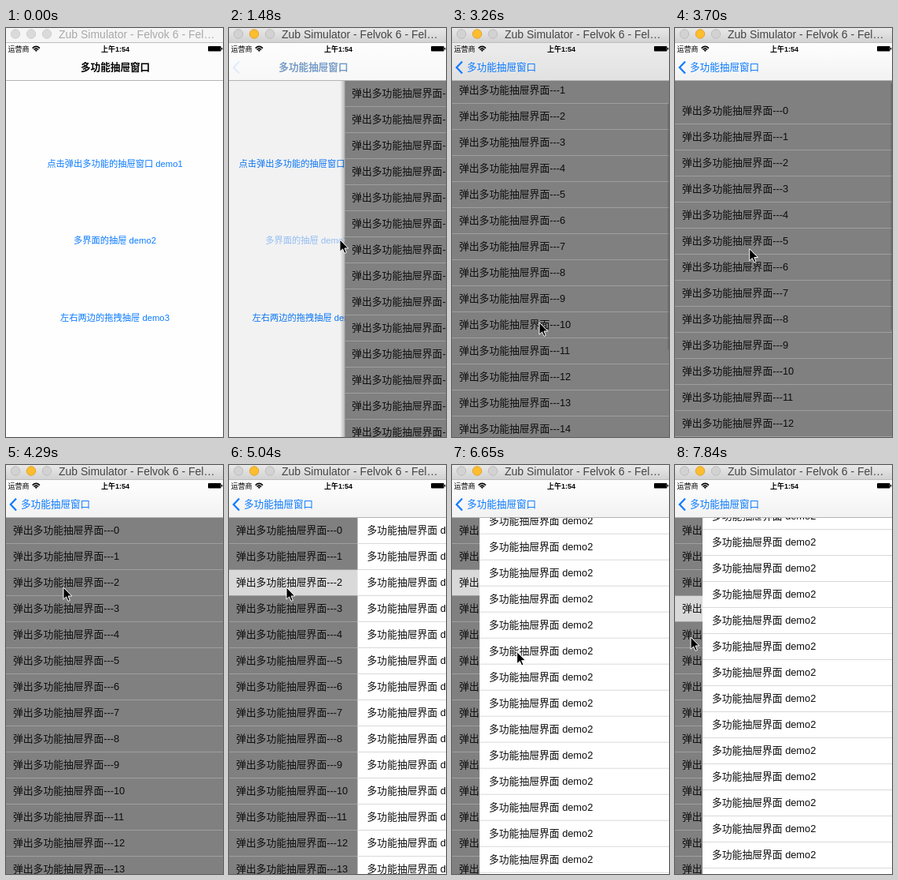
Write an HTML page that moves like this. It is 276 px wide and 518 px high and loops after 7.99 s.

```html
<!DOCTYPE html>
<html lang="zh-CN">
<head>
<meta charset="utf-8">
<title>抽屉窗口</title>
<style>
  html, body { margin: 0; width: 100%; height: 100%; overflow: hidden; background: #fff; }
  svg { display: block; width: 100%; height: 100%; }
  text { font-family: "Liberation Sans", "Noto Sans CJK SC", "Noto Sans CJK JP", sans-serif; white-space: pre; }
  .row { font-size: 12.8px; fill: #0c0c0c; }
  .link { font-size: 11.25px; fill: #0a7aff; text-anchor: middle; }
  .nav { font-size: 12.6px; }
  .status { font-size: 9px; }
  .bold { font-weight: bold; }

  #caption { font-size: 14px; fill: #a9a9a9; }
  #bar-bg { fill: #f5f5f5; }
  #lights { fill: #dadada; stroke: #cfcfcf; }
  .active #caption { fill: #454545; }
  .active #bar-bg { fill: url(#bar); }
  .active #lights { fill: #d2d2d2; stroke: #bcbcbc; }
  .active #middle { fill: #fdbd2e; stroke: #e2a329; }
  .active #pressed { opacity: .42; }
</style>
</head>
<body>
<svg id="stage" viewBox="0 0 276 518">
  <defs>
    <linearGradient id="bar" x2="0" y2="1">
      <stop stop-color="#e8e8e8"/><stop offset="1" stop-color="#d1d1d1"/>
    </linearGradient>
    <linearGradient id="tint" x2="0" y2="1">
      <stop offset=".2" stop-color="#000" stop-opacity="0"/><stop offset="1" stop-color="#000" stop-opacity=".04"/>
    </linearGradient>
    <linearGradient id="edge">
      <stop stop-color="#000" stop-opacity="0"/><stop offset="1" stop-color="#000" stop-opacity=".25"/>
    </linearGradient>
  </defs>

  <rect width="276" height="518" fill="#fefefe"/>
  <g id="home">
    <text class="link" x="138.5" y="175.5">点击弹出多功能的抽屉窗口 demo1</text>
    <text class="link" x="138.5" y="273" id="pressed">多界面的抽屉 demo2</text>
    <text class="link" x="138.5" y="370.5">左右两边的拖拽抽屉 demo3</text>
  </g>
  <rect id="dim" y="66" width="276" height="452"/>

  <g id="list">
    <rect x="-6" y="66" width="6" height="452" fill="url(#edge)"/>
    <rect y="66" width="276" height="452" fill="#808080"/>
    <g id="listRows"><rect id="mark" width="276" height="33" fill="#d9d9d9"/></g>
    <rect id="thumb" x="274.5" width="1.5" height="312" fill-opacity=".18"/>
  </g>

  <g id="drawer">
    <rect y="66" width="276" height="452" fill="#fff"/>
    <g id="drawerRows"></g>
  </g>

  <rect y="19" width="276" height="47" fill="#fcfcfc"/>
  <rect id="tintBar" y="19" width="276" height="47" fill="url(#tint)"/>
  <rect id="shade" y="19" width="276" height="47"/>
  <rect y="66" width="276" height="1" fill="#b5b5b5"/>
  <text class="nav bold" id="title" y="54.4">多功能抽屉窗口</text>
  <text class="nav" id="back" y="54.4" fill="#0a7aff">多功能抽屉窗口</text>
  <path id="chevron" d="M13 42.5 5.8 50 13 57.5" fill="none" stroke="#0a7aff" stroke-width="2.2"/>

  <text class="status" x="2.5" y="29.5">运营商</text>
  <g fill="none" stroke="#000" stroke-width="1.5">
    <path d="M33.6 25.6Q38.3 21.2 43 25.6M35.4 27.4Q38.3 24.8 41.2 27.4"/>
    <path d="M36.6 28.2Q38.3 27 40 28.2L38.3 30Z" fill="#000" stroke="none"/>
  </g>
  <text class="status bold" x="139" y="29.5" text-anchor="middle">上午1:54</text>
  <rect x="257" y="23" width="16.5" height="6.5" rx="1"/>
  <rect x="274" y="25" width="1.2" height="2.5"/>

  <rect id="bar-bg" width="276" height="19"/>
  <rect y="18" width="276" height="1" fill="#bdbdbd"/>
  <g id="lights">
    <circle cx="12" cy="7.5" r="5.7"/><circle id="middle" cx="32" cy="7.5" r="5.7"/><circle cx="52" cy="7.5" r="5.7"/>
  </g>
  <text id="caption" x="67" y="13">Zub Simulator - Felvok 6 - Fel…</text>

  <path id="cursor" d="M0 0V15.2L3.6 11.9 6 17.4 8.4 16.4 6 11H10.8Z" stroke="#fff"/>
</svg>
<script>
const LOOP = 7990, STEPS = 54, ROW = 33, TOP = 66, WIDTH = 276;
const $ = id => document.getElementById(id);

function set(node, attrs) {
  for (const key in attrs) node.setAttribute(key, attrs[key]);
  return node;
}
function add(parent, tag, attrs, text = '') {
  const node = set(document.createElementNS('http://www.w3.org/2000/svg', tag), attrs);
  node.textContent = text;
  parent.append(node);
}
function fillRows(parent, x, line, label) {
  for (let i = 0; i < 20; i++) {
    add(parent, 'rect', { y: ROW * (i + 1), width: WIDTH, height: 1, fill: line });
    add(parent, 'text', { class: 'row', x, y: ROW * i + 21.3 }, label(i));
  }
}
fillRows($('listRows'), 9, '#9f9f9f', i => '弹出多功能抽屉界面---' + i);
fillRows($('drawerRows'), 12, '#d9d9d9', () => '多功能抽屉界面 demo2');

const clamp = v => Math.min(1, Math.max(0, v));
const easeOut = (n, start, length) => 1 - (1 - clamp((n - start) / length)) ** 1.55;
const move = (x, y) => ({ transform: `translate(${x} ${y})` });

// Straight travel through [step, ...values] points
function along(points, n) {
  const next = points.findIndex(point => point[0] >= n);
  if (next < 1) return points.at(next).slice(1);
  const a = points[next - 1], b = points[next];
  const u = (n - a[0]) / (b[0] - a[0]);
  return a.slice(1).map((v, i) => v + (b[i + 1] - v) * u);
}
const listDrag = [[16, 0], [17, 45], [19, 60], [22, 37], [23, 0], [25, -22], [28, 0]];
const pointer = [[3, 121, 289], [7, 141, 268], [10, 141, 268], [15, 100, 333], [17, 99, 295],
  [22, 111, 373], [29, 73, 155], [35, 73, 155], [40, 127, 236], [48, 56, 237], [53, 20, 218]];

function draw(n) {
  const push = easeOut(n, 9, 3);
  const open = easeOut(n, 33, 3);
  const [offset] = along(listDrag, n);
  const [x, y] = along(pointer, n);

  $('stage').classList.toggle('active', n >= 9);

  set($('home'), move(-85 * push, 0));
  set($('dim'), { opacity: .1 * push });
  set($('list'), { ...move(WIDTH * (1 - push), 0), opacity: push > 0 ? 1 : 0 });
  set($('listRows'), move(0, TOP - offset));
  set($('mark'), { y: ROW * (n < 52 ? 2 : 3), opacity: n >= 33 ? 1 : 0 });
  set($('thumb'), { y: TOP + 4 + Math.max(0, offset) * .685, opacity: n >= 17 && n < 28 ? 1 : 0 });

  set($('drawer'), move(WIDTH - 241 * open, 0));
  set($('drawerRows'), move(0, TOP - 25 * easeOut(n, 36, 4) - 26 * easeOut(n, 40, 8)));

  const titleX = 95 - 76 * push ** 1.15;
  set($('title'), { x: titleX, opacity: (1 - push) ** 2 });
  set($('back'), { x: titleX, opacity: push });
  set($('chevron'), { opacity: push ** 3 });
  set($('tintBar'), { opacity: push });
  set($('shade'), { opacity: .07 * clamp(offset / 30) });

  set($('cursor'), { ...move(x, y), opacity: n >= 3 ? 1 : 0 });
}

const start = performance.now();
function tick() {
  const time = (performance.now() - start) % LOOP;
  draw(Math.min(STEPS - 1, Math.floor(time / LOOP * STEPS + .08)));
  requestAnimationFrame(tick);
}
tick();
</script>
</body>
</html>
```
